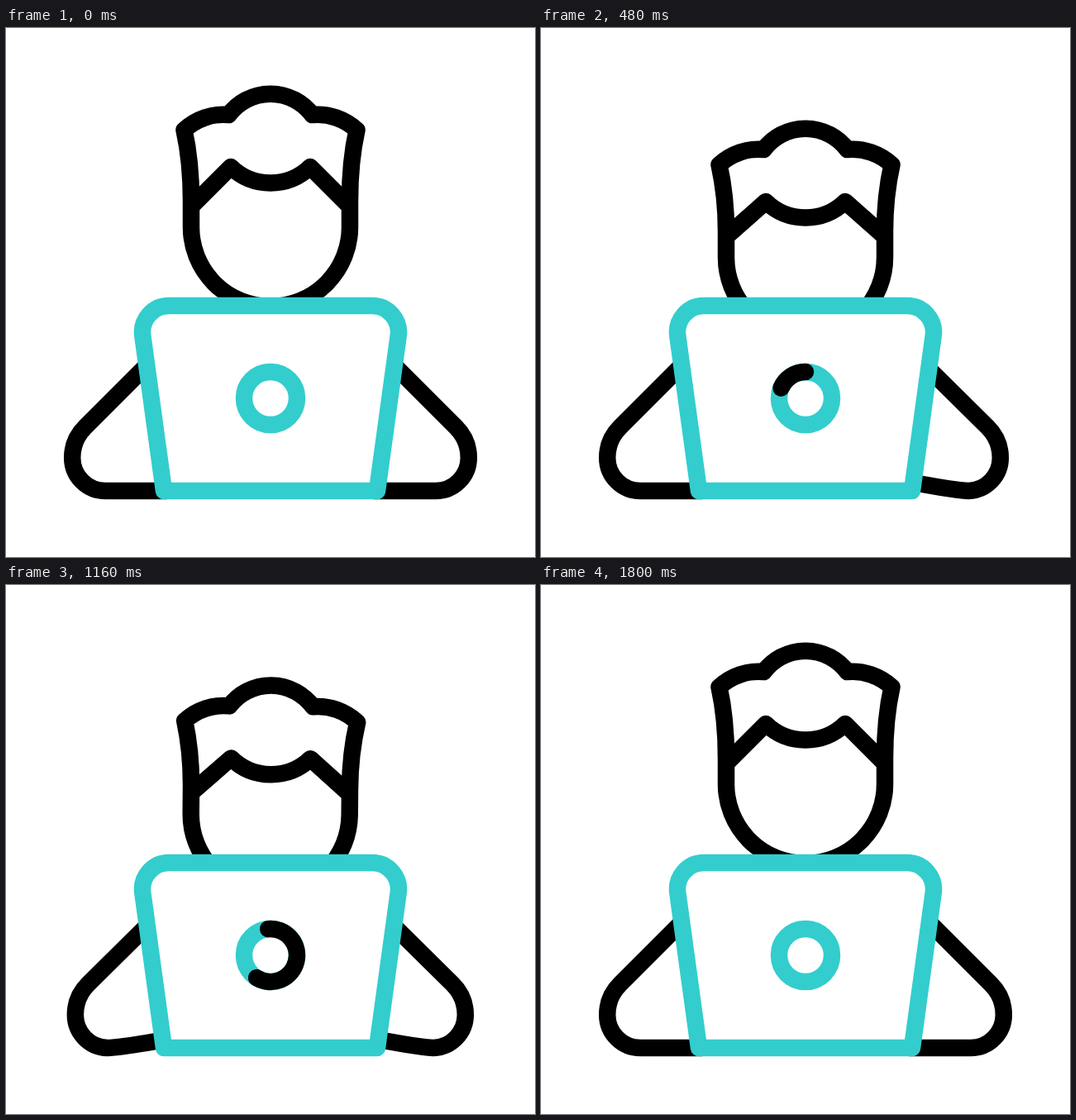
Recreate the animation shown at these times as an HTML page. Size 640x640 px, loop 2000 ms.

```html
<!DOCTYPE html>
<html lang="en">
<head>
<meta charset="utf-8">
<title>Working at a laptop</title>
<style>
  html, body { margin: 0; width: 100%; height: 100%; overflow: hidden; background: #fff; }
  svg { display: block; width: 100vw; height: 100vh; }
  path, circle { fill: none; stroke: #000; stroke-width: 20.5; stroke-linejoin: round; }
  .teal { stroke: #33cdcd; }
  .lid { fill: #fff; }
  #arc { stroke-linecap: round; }
</style>
</head>
<body>
<svg viewBox="0 0 640 640">
  <path id="left"/>
  <path id="right" transform="matrix(-1 0 0 1 640 0)"/>
  <path id="head"/>
  <path class="teal lid" d="M197 336H443A32 32 0 0 1 474.7 372.3L449 560H191L165.3 372.3A32 32 0 0 1 197 336Z"/>
  <circle class="teal" cx="320" cy="448" r="32"/>
  <path id="arc"/>
</svg>
<script>
const LOOP = 2000, TICK = 40, LAST = 45;
const el = id => document.getElementById(id);
const [left, right, head, arc] = ['left', 'right', 'head', 'arc'].map(el);

// Tracks of [tick, value], eased between neighbours
const tracks = {
  left: [[1, 0], [6.5, 1], [12, 0], [17.5, 1], [23, 0], [28, 1], [33.5, 0], [38, 1], [42.7, 0]],
  right: [[6.5, 0], [12, 1], [17.5, 1], [23, 0], [28, 1], [33.5, 1], [38.5, 0]],
  drop: [[1, 0], [7, 42], [17, 42], [25, 48.2], [42.5, 0]],
  tilt: [[12, 0], [17.5, -4.7], [28, 0.5], [42.5, 0]],
  tail: [[16.6, 0], [45, 365]],
  tip: [[5.7, 0], [28.7, 365]]
};

function sample(keys, t) {
  if (t <= keys[0][0]) return keys[0][1];
  for (let i = 1; i < keys.length; i++) {
    const [a, va] = keys[i - 1], [b, vb] = keys[i];
    if (t < b) {
      const p = (t - a) / (b - a);
      return va + (vb - va) * p * p * (3 - 2 * p);
    }
  }
  return keys[keys.length - 1][1];
}

// u: 0 resting on the desk, 1 hand raised
function armPath(u) {
  const x = 4 * u;
  return `M181 ${397.5 + 5 * u}L${95.5 + x} 483A52.4 52.4 0 0 0 ${80.2 + x} 520` +
    `A40 40 0 0 0 ${120.2 + x * 0.6} 560` +
    `C${140 + x} ${560 - u} ${165} ${560 - 6 * u} 195 ${560 - 11 * u}`;
}

// The hair drops by d, the face a little less
function headPath(d) {
  const f = 0.87 * d, y = v => v + d, g = v => v + f;
  return `M215.5 ${y(123.5)}C230 ${y(110)} 250 ${y(103)} 269.5 ${y(105)}` +
    `A63 63 0 0 1 370.5 ${y(105)}C390 ${y(103)} 410 ${y(110)} 424.5 ${y(123.5)}` +
    `C419 ${y(148)} 416 ${g(180)} 416 ${g(210)}V${g(241)}A96 96 0 0 1 224 ${g(241)}V${g(210)}` +
    `C224 ${g(180)} 221 ${y(148)} 215.5 ${y(123.5)}Z` +
    `M224 ${g(216)}L272 ${y(168)}A68.8 68.8 0 0 0 368 ${y(168)}L416 ${g(216)}`;
}

// Angles run counterclockwise from the top
function arcPath(from, to) {
  const at = deg => {
    const r = deg * Math.PI / 180;
    return `${320 - 32 * Math.sin(r)} ${448 - 32 * Math.cos(r)}`;
  };
  return `M${at(from)}A32 32 0 ${to - from > 180 ? 1 : 0} 0 ${at(to)}`;
}

function draw(ms) {
  const t = Math.min(LAST, Math.floor((ms % LOOP) / TICK));
  const now = name => sample(tracks[name], t);
  left.setAttribute('d', armPath(now('left')));
  right.setAttribute('d', armPath(now('right')));
  head.setAttribute('d', headPath(now('drop')));
  head.setAttribute('transform', `rotate(${now('tilt')} 320 245)`);
  const tail = now('tail'), tip = now('tip');
  arc.setAttribute('d', tip - tail > 0.01 ? arcPath(tail, tip) : '');
}

const start = performance.now();
function loop() {
  draw(performance.now() - start);
  requestAnimationFrame(loop);
}
loop();
</script>
</body>
</html>
```
